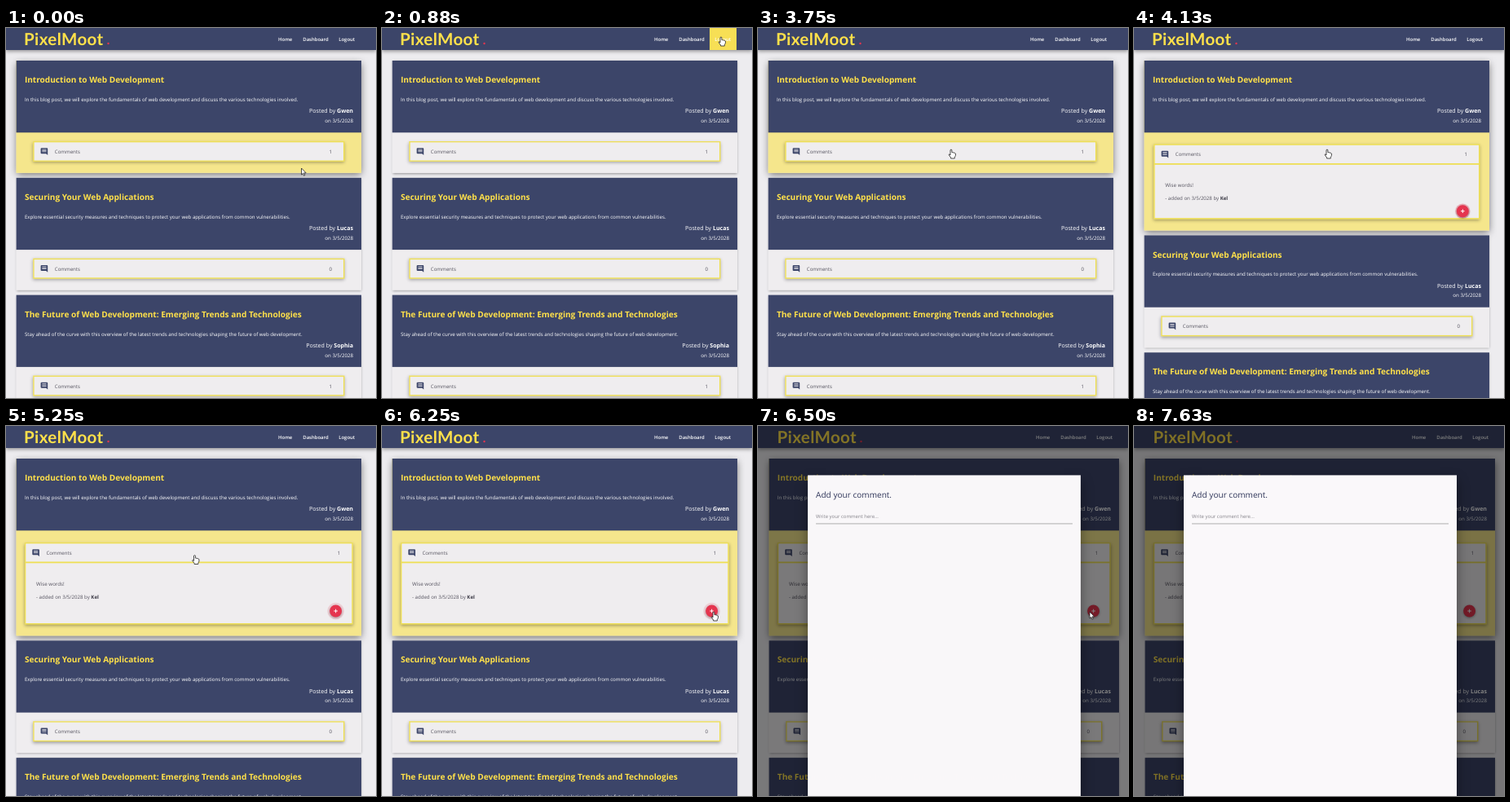
Animation, 454 px wide and 454 px high, one loop 8000 ms. Source, as an HTML page with a canvas:

```html
<!DOCTYPE html>
<html lang="en">
<head>
<meta charset="utf-8">
<title>Blog comments</title>
<style>
html, body { margin: 0; width: 100%; height: 100%; overflow: hidden; background: #edecef; }
canvas { display: block; width: 454px; height: 454px; }
</style>
</head>
<body>
<canvas id="stage"></canvas>
<script>
const SIZE = 454, LOOP = 8000, STEP = 125;
const OPEN_AT = 3928, MODAL_AT = 6285;
const NAVY = '#3c4569', YELLOW = '#ffe14a', BORDER = '#eedf55', PALE = '#f5e68c',
      PAPER = '#efedef', GREY = '#55535f', RED = '#e5354f';
const canvas = document.getElementById('stage');
const ctx = canvas.getContext('2d');
const ratio = window.devicePixelRatio || 1;
canvas.width = canvas.height = SIZE * ratio;

const posts = [
  { title: 'Introduction to Web Development', author: 'Gwen', count: 1,
    text: 'In this blog post, we will explore the fundamentals of web development and discuss the various technologies involved.' },
  { title: 'Securing Your Web Applications', author: 'Lucas', count: 0,
    text: 'Explore essential security measures and techniques to protect your web applications from common vulnerabilities.' },
  { title: 'The Future of Web Development: Emerging Trends and Technologies', author: 'Sophia', count: 1,
    text: 'Stay ahead of the curve with this overview of the latest trends and technologies shaping the future of web development.' }
];
const links = [
  { label: 'Home', x: 342.7, left: 328, right: 357.5 },
  { label: 'Dashboard', x: 380, left: 357.5, right: 402 },
  { label: 'Logout', x: 418.2, left: 402, right: 435 }
];
// Pointer path: time, x, y
const path = [
  [0, 362.5, 172], [125, 362.5, 172], [880, 416, 11], [1250, 380, 11], [1880, 341.5, 11.5],
  [2500, 341.5, 11.5], [3250, 241, 147], [3600, 237, 149], [4700, 237, 149],
  [5250, 231.5, 158.5], [5900, 407, 228], [6500, 407, 228], [7300, 230, 108]
];

const clamp = v => Math.min(1, Math.max(0, v));
const mix = (a, b, p) => a + (b - a) * p;
const progress = (t, start, length) => clamp((t - start) / length);
const easeOut = (p, power) => 1 - (1 - p) ** power;
const inOutQuart = p => p < .5 ? 8 * p ** 4 : 1 - 8 * (1 - p) ** 4;

function pointerAt(t) {
  const i = path.findIndex(key => key[0] > t);
  if (i < 0) return null;
  const [t0, x0, y0] = path[i - 1], [t1, x1, y1] = path[i];
  const p = (t - t0) / (t1 - t0), e = p * p * (3 - 2 * p);
  return { x: mix(x0, x1, e), y: mix(y0, y1, e) };
}

function rect(x, y, w, h, color, shadow) {
  ctx.fillStyle = color;
  if (shadow) {
    // Keep the shadow outside the box so translucent boxes stay clean.
    ctx.save();
    ctx.beginPath();
    ctx.rect(-SIZE, -SIZE, 3 * SIZE, 3 * SIZE);
    ctx.rect(x, y, w, h);
    ctx.clip('evenodd');
    ctx.shadowColor = `rgba(0,0,0,${shadow.alpha})`;
    ctx.shadowBlur = shadow.blur * ratio;
    ctx.shadowOffsetY = shadow.drop * ratio;
    ctx.fillRect(x, y, w, h);
    ctx.restore();
  }
  ctx.fillRect(x, y, w, h);
}

// Returns the width of the drawn text.
function text(str, x, y, size, color, { weight = 400, align = 'left', family = '"Open Sans"' } = {}) {
  ctx.font = `${weight} ${size}px ${family}, sans-serif`;
  ctx.textAlign = align;
  ctx.fillStyle = color;
  ctx.fillText(str, x, y);
  return ctx.measureText(str).width;
}

function circle(x, y, r, color) {
  ctx.fillStyle = color;
  ctx.beginPath();
  ctx.arc(x, y, r, 0, 7);
  ctx.fill();
}

function drawNav(pointer, wide) {
  rect(0, 0, SIZE, 27, NAVY, { alpha: .35, blur: 4, drop: 1.5 });
  ctx.letterSpacing = '0.4px';
  text('PixelMoot', 22 + 1.5 * wide, 20.5, 20.5, YELLOW, { weight: 700, family: 'Lato' });
  ctx.letterSpacing = '0px';
  circle(125.5 + wide, 19, 1.2, RED);
  for (const { label, x, left, right } of links) {
    if (pointer && !wide && pointer.y < 27 && pointer.x >= left && pointer.x < right)
      rect(left, 0, right - left, 27, '#f7df55');
    text(label, x + 7 * wide, 15.8, 5.95, '#fff', { weight: 600, align: 'center' });
  }
}

function drawChatIcon(x, y) {
  ctx.fillStyle = NAVY;
  ctx.beginPath();
  ctx.roundRect(x, y, 8.6, 7, 1);
  ctx.moveTo(x + 6, y + 6.5);
  ctx.lineTo(x + 8.6, y + 6);
  ctx.lineTo(x + 8.6, y + 8.8);
  ctx.fill();
  for (let i = 0; i < 3; i++) rect(x + 1.7, y + 1.5 + i * 1.4, 5.2, .7, PAPER);
}

function drawAddButton(x, y, t) {
  const pulse = easeOut(clamp((t % 1000) / 500), 2);
  ctx.globalAlpha = .6 * (1 - pulse);
  circle(x, y, 7.5 * (1 + pulse / 2), RED);
  ctx.globalAlpha = 1;
  ctx.save();
  ctx.shadowColor = 'rgba(0,0,0,.35)';
  ctx.shadowBlur = 3 * ratio;
  ctx.shadowOffsetY = ratio;
  circle(x, y, 7.5, RED);
  ctx.restore();
  rect(x - 2.3, y - .5, 4.6, 1, '#fff');
  rect(x - .5, y - 2.3, 1, 4.6, '#fff');
}

function drawComments(box, count, t) {
  const { x, y, w, h, body, grown } = box;
  rect(x, y, w, h, BORDER, { alpha: .35, blur: 4, drop: 1.5 });
  rect(x + 1.3, y + 1.3, w - 2.6, h - 2.6, PAPER);
  drawChatIcon(x + 9.3, y + 8.2);
  text('Comments', x + 26.5, y + 15, 6.1, GREY);
  text(count, x + w - 17, y + 15, 6.1, GREY, { align: 'center' });
  if (!body) return;
  ctx.save();
  ctx.beginPath();
  ctx.rect(x, y, w, h);
  ctx.clip();
  rect(x, y + 23.5, w, 1.8, BORDER);
  text('Wise words!', x + 14, y + 52.5, 6.2, GREY);
  const used = text('- added on 3/5/2028 by ', x + 14, y + 68.8, 6.1, GREY);
  text('Kel', x + 14 + used, y + 68.8, 6.1, '#3d3c48', { weight: 700 });
  drawAddButton(x + w - 21, y + 84 - 16 * (1 - grown), t);
  ctx.restore();
}

function drawCard(post, left, right, top, hovered, box, t) {
  const width = right - left, bottom = box.y + box.h + 14;
  rect(left, top, width, bottom - top, hovered ? PALE : PAPER,
    hovered ? { alpha: .55, blur: 9, drop: 2.5 } : { alpha: .4, blur: 3, drop: 1 });
  rect(left, top, width, 88.3, NAVY);
  const x = left + 10.3, end = right - 10;
  text(post.title, x, top + 27.1, 10.08, YELLOW, { weight: 700 });
  text(post.text, x, top + 50, 6.11, '#fff');
  const nameWidth = text(post.author, end, top + 64.3, 7.05, '#fff', { weight: 700, align: 'right' });
  text('Posted by ', end - nameWidth, top + 64.3, 7.05, '#fff', { align: 'right' });
  text('on 3/5/2028', end, top + 76, 6.15, '#fff', { align: 'right' });
  drawComments(box, post.count, t);
  return bottom;
}

function drawModal(t) {
  const p = progress(t, MODAL_AT, 250), e = easeOut(p, 3), scale = .8 + .2 * e;
  rect(0, 0, SIZE, SIZE, `rgba(0,0,0,${.5 * easeOut(p, 2)})`);
  ctx.save();
  ctx.globalAlpha = e;
  ctx.translate(228.5 * (1 - scale), 18 * (1 - e));
  ctx.scale(scale, scale);
  rect(61, 60.5, 335, 435, '#faf8fa', { alpha: .4, blur: 14, drop: 6 });
  text('Add your comment.', 71, 87.8, 10.07, '#30365a');
  text('Write your comment here...', 71, 113, 6, '#85838a');
  rect(71, 119.6, 315, .7, '#8e8e8e');
  rect(352, 468, 42, 18, '#d9122f');
  text('Add', 373, 479, 6, '#fff', { align: 'center' });
  ctx.restore();
}

function outline(points, x, y) {
  ctx.beginPath();
  points.forEach(([px, py]) => ctx.lineTo(x + px, y + py));
  ctx.closePath();
  ctx.fillStyle = '#fff';
  ctx.strokeStyle = '#222';
  ctx.lineWidth = .8;
  ctx.lineJoin = 'round';
  ctx.fill();
  ctx.stroke();
}

const arrow = [[0, 0], [0, 8], [1.8, 6.4], [3, 9.2], [4.3, 8.6], [3.1, 5.9], [5.6, 5.8]];
const hand = [[-1, .6], [0, 0], [.9, .6], [.9, 3.6], [2.6, 3.8], [4.3, 4.3], [5.4, 5],
  [5.4, 7.6], [4.3, 9.6], [4.3, 11], [-.4, 11], [-.4, 10], [-2.8, 6.8], [-2.4, 5.8], [-1, 6.9]];

function draw(t) {
  const wide = t >= MODAL_AT ? 1 : 0;
  const pointer = pointerAt(t);
  const left = 12.6 + .9 * wide, right = 436 + 7 * wide;
  const spread = easeOut(progress(t, OPEN_AT, 350), 2.5);
  const grown = inOutQuart(progress(t, OPEN_AT, 300));
  ctx.setTransform(ratio, 0, 0, ratio, 0, 0);
  ctx.textRendering = 'geometricPrecision';
  rect(0, 0, SIZE, SIZE, '#edecef');

  let top = 40, overHeader = false;
  posts.forEach((post, i) => {
    const first = i === 0, s = first ? spread : 0, body = first ? 75.5 * grown : 0;
    const inset = 20.7 - 10.3 * s;
    const box = { x: left + inset, y: top + 99 + 4 * s, w: right - left - 2 * inset, h: 24.8 + body, body, grown };
    const bottom = box.y + box.h + 14;
    const inside = pointer && pointer.x > left && pointer.x < right && pointer.y > top && pointer.y < bottom;
    const hovered = wide ? first : inside;
    if (inside && pointer.x > box.x && pointer.x < box.x + box.w && pointer.y > box.y && pointer.y < box.y + 24.8)
      overHeader = true;
    top = drawCard(post, left, right, top, hovered, box, t) + 6;
  });
  drawNav(pointer, wide);
  if (wide) drawModal(t);
  if (pointer) {
    const overLink = pointer.y < 27 && pointer.x > 328 && pointer.x < 435;
    const overButton = Math.hypot(pointer.x - 405, pointer.y - 227) < 7.5;
    const linked = !wide && (overLink || overHeader || overButton);
    outline(linked ? hand : arrow, pointer.x, pointer.y);
  }
}

const start = performance.now();
function tick() {
  const t = (performance.now() - start) % LOOP;
  draw(Math.floor(t / STEP) * STEP);
  requestAnimationFrame(tick);
}
tick();
</script>
</body>
</html>
```
